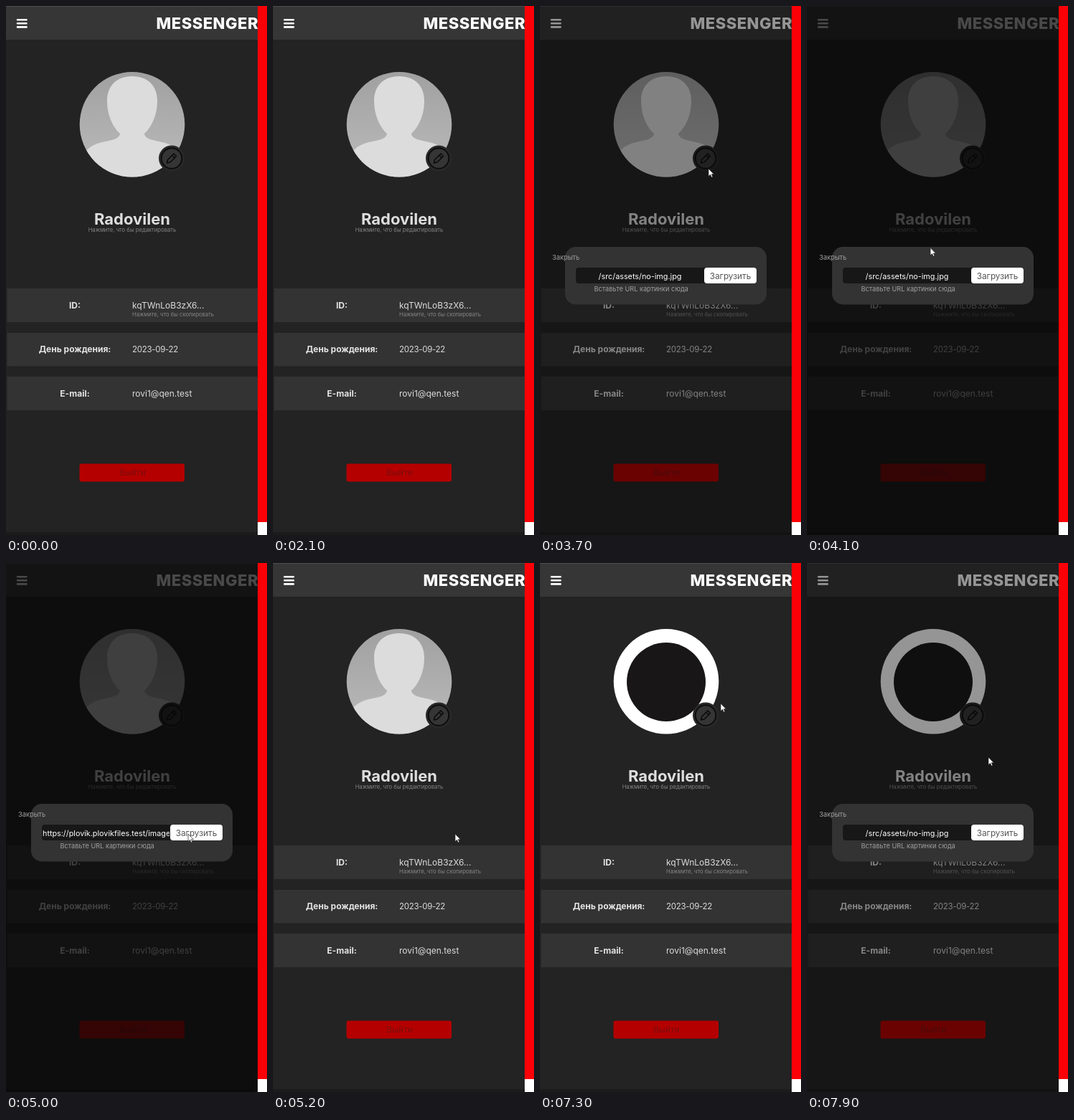
Animation, 364 px wide and 738 px high, one loop 8 s. Source, as an HTML page:

```html
<!DOCTYPE html>
<html lang="ru">
<head>
<meta charset="utf-8">
<style>
  html, body { margin: 0; width: 100%; height: 100%; overflow: hidden; background: #232323; }
  svg { display: block; width: 364px; height: 738px; font: 12px Inter, "Open Sans", sans-serif; }
  .mid { text-anchor: middle; }
  .label { text-anchor: middle; font-weight: 700; fill: #e4e4e4; }
  .value { fill: #dcdcdc; }
  .hint { font-size: 7.7px; fill: #858585; }
  .field { font-size: 10.8px; fill: #fff; }
</style>
</head>
<body>
<svg viewBox="0 0 364 738">
  <defs>
    <linearGradient id="grey" x1="0" y1="0" x2="0" y2="1">
      <stop offset="0" stop-color="#a0a0a0"/>
      <stop offset="1" stop-color="#bcbcbc"/>
    </linearGradient>
    <clipPath id="round"><circle cx="176" cy="165.3" r="73.3"/></clipPath>
    <clipPath id="input"><rect x="51" y="365" width="177" height="22"/></clipPath>
    <clipPath id="screen"><rect width="351" height="738"/></clipPath>
  </defs>

  <g clip-path="url(#screen)">
    <rect width="351" height="738" fill="#232323"/>
    <rect y="734" width="351" height="4" fill="#1b1b1b"/>
    <rect width="351" height="47" fill="#363636"/>
    <rect width="351" height="1" fill="#4c4c4c"/>
    <path d="M16 19.2H28.5M16 24.3H28.5M16 29.4H28.5" stroke="#fff" stroke-width="2.6" stroke-linecap="round"/>
    <text x="352" y="32" text-anchor="end" font-size="22" font-weight="800" letter-spacing=".5" fill="#fff">MESSENGER</text>

    <g clip-path="url(#round)">
      <g id="blank">
        <rect x="102" y="91" width="148" height="148" fill="url(#grey)"/>
        <path fill="#dcdcdc" d="M176 98C198 98 211 112 211 132C211 155 201 171 193 178C194 186 205 187 218 190C236 194 245 204 249 220V240H103V220C107 204 116 194 134 190C147 187 158 186 159 178C151 171 141 155 141 132C141 112 154 98 176 98Z"/>
      </g>
      <g id="custom">
        <rect x="102" y="91" width="148" height="148" fill="#fff"/>
        <circle cx="176" cy="166" r="55" fill="#181616"/>
      </g>
    </g>

    <circle cx="231" cy="212.5" r="18" fill="#292929"/>
    <circle cx="231" cy="212.5" r="14.3" fill="#353535" stroke="#0d0d0d" stroke-width="2"/>
    <path d="M224.5 219L225.5 214.5L234 206L237.500 209.500L229 218ZM231.700 208.300L235.200 211.800" fill="none" stroke="#0a0a0a" stroke-width="1.600" stroke-linejoin="round"/>

    <text class="mid" x="176" y="305" font-size="22" font-weight="700" fill="#dedede">Radovilen</text>
    <text class="hint mid" x="176" y="314.500">Нажмите, что бы редактировать</text>

    <g fill="#333">
      <rect x="1.500" y="394" width="350" height="47"/>
      <rect x="1.500" y="456" width="350" height="46.500"/>
      <rect x="1.500" y="517" width="350" height="47"/>
    </g>
    <text class="label" x="96" y="422">ID:</text>
    <text class="label" x="96" y="483">День рождения:</text>
    <text class="label" x="96" y="544.500">E-mail:</text>
    <text class="value" x="176" y="422">kqTWnLoB3zX6...</text>
    <text class="hint" x="176" y="432.500">Нажмите, что бы скопировать</text>
    <text class="value" x="176" y="483" font-size="11.500" letter-spacing="-.3">2023-09-22</text>
    <text class="value" x="176" y="544.500">rovi1@qen.test</text>

    <rect x="102.500" y="638.500" width="146.500" height="25" rx="3" fill="#b50000"/>
    <text class="mid" x="176.500" y="655" fill="#7c0c0c">Выйти</text>

    <rect id="shade" width="351" height="738" fill="#060606"/>
    <g id="modal">
      <rect x="35" y="336" width="281" height="80.500" rx="15" fill="#333"/>
      <text x="17" y="354" font-size="9.300" fill="#a0a0a0">Закрыть</text>
      <rect x="50" y="365" width="184" height="22" rx="4" fill="#171717"/>
      <g clip-path="url(#input)"><text id="field" class="field" y="380.500"></text></g>
      <rect x="229" y="365" width="73" height="22" rx="4" fill="#fff"/>
      <text class="mid" x="265.500" y="380.500" font-size="11.800" fill="#555">Загрузить</text>
      <text x="75.500" y="398" font-size="9.200" fill="#a0a0a0">Вставьте URL картинки сюда</text>
    </g>
  </g>

  <rect x="351" width="13" height="720" fill="#fb0006"/>
  <rect x="351" y="720" width="13" height="18" fill="#fff"/>
  <path id="cursor" d="M0 0V10.500L2.500 8.300L4.200 12L5.900 11.200L4.300 7.700H7.500Z" fill="#fff" stroke="#222" stroke-width=".7"/>
</svg>

<script>
  const LOOP = 8000, STEP = 100;
  const FADE = 430, DIM = 0.73;
  const OPEN = [[3450, 5200], [7650, LOOP]];
  const PASTE = 4400, BLUR = 5000, LOADED = 5400;

  // time, x, y of the pointer tip
  const PATH = [
    [2600, 346, 420], [2900, 292, 305], [3300, 235, 227], [3700, 235, 227],
    [4300, 150, 376], [4400, 150, 376], [4800, 254, 378], [5400, 254, 378],
    [6400, 249, 195], [6800, 249, 195], [6900, 250, 195], [7100, 250, 195],
    [7300, 252, 196], [7500, 236, 214], [7650, 236, 214], [7900, 253, 271], [8000, 256, 284]
  ];

  const TEXTS = {
    initial: ["/src/assets/no-img.jpg", 139.5, "middle"],
    tail: ["ages/pictures/round/Dark-Disc.png", 227, "end"],
    head: ["https://plovik.plovikfiles.test/images", 51, "start"]
  };

  const $ = id => document.getElementById(id);
  const show = (id, on) => { $(id).style.display = on ? "" : "none"; };

  function pointer(t) {
    const i = PATH.findIndex(p => p[0] > t);
    const [t0, x0, y0] = PATH[i - 1], [t1, x1, y1] = PATH[i];
    const u = (t - t0) / (t1 - t0), e = u * u * (3 - 2 * u);
    return [x0 + (x1 - x0) * e, y0 + (y1 - y0) * e];
  }

  function setField(key) {
    const field = $("field"), [text, x, anchor] = TEXTS[key];
    if (field.textContent !== text) field.textContent = text;
    field.setAttribute("x", x);
    field.setAttribute("text-anchor", anchor);
  }

  function draw(t) {
    const open = OPEN.find(([from, to]) => t >= from && t < to);
    show("modal", open);
    $("shade").setAttribute("opacity", open ? DIM * Math.min(1, (t - open[0]) / FADE) : 0);
    setField(t < PASTE || t >= OPEN[0][1] ? "initial" : t < BLUR ? "tail" : "head");

    show("blank", t < LOADED);
    show("custom", t >= LOADED);

    const visible = t >= PATH[0][0];
    show("cursor", visible);
    if (visible) $("cursor").setAttribute("transform", `translate(${pointer(t)})`);
  }

  const start = performance.now();
  function tick() {
    const t = (performance.now() - start) % LOOP;
    draw(Math.floor(t / STEP) * STEP);
    requestAnimationFrame(tick);
  }
  tick();
</script>
</body>
</html>
```
